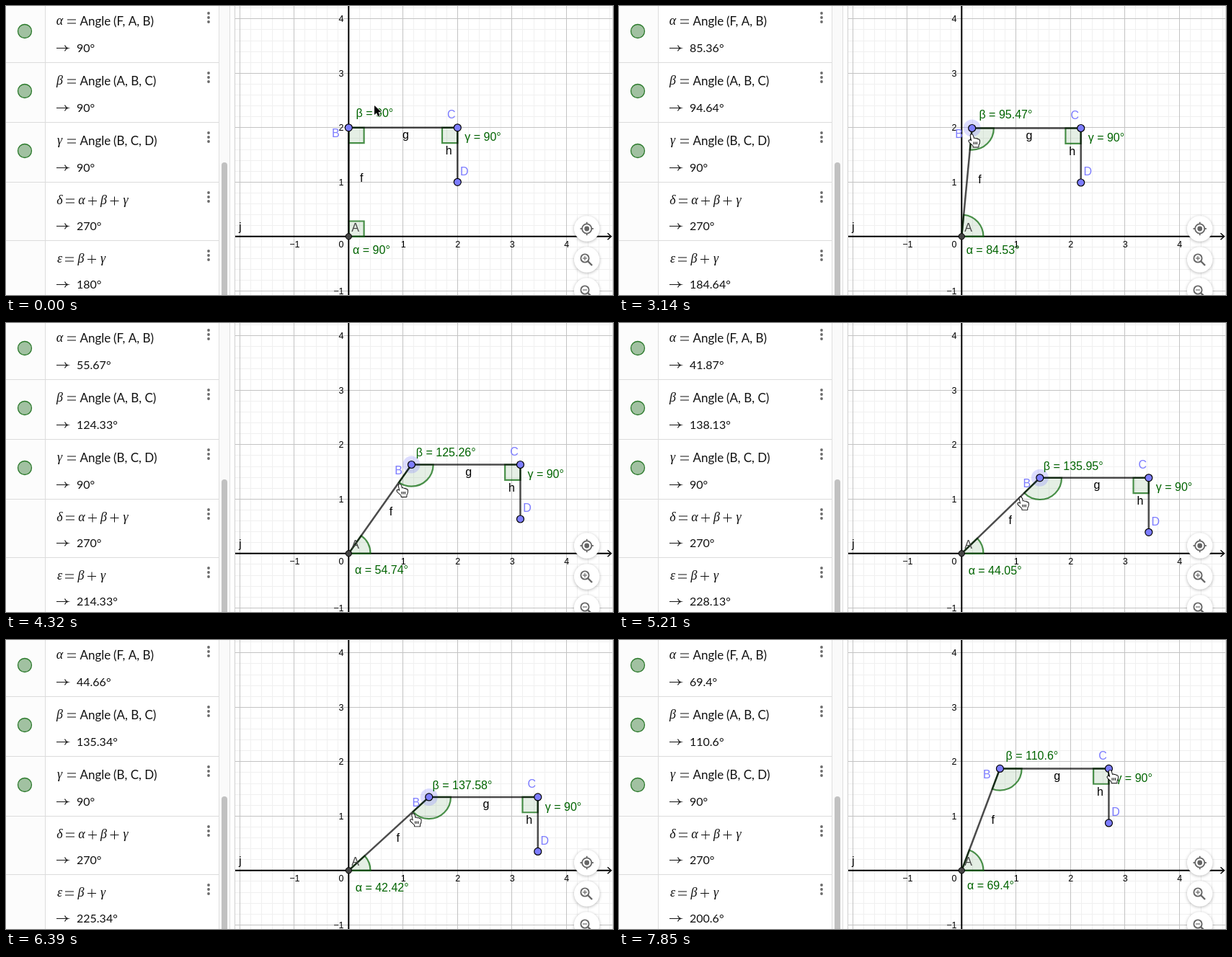
An HTML page with a canvas that plays this animation: 842 by 401 pixels, repeating every 8 s.

```html
<!DOCTYPE html>
<html lang="en">
<head>
<meta charset="utf-8">
<title>Angle sum</title>
<style>
html, body { margin: 0; width: 842px; height: 401px; overflow: hidden; background: #fff; }
canvas { display: block; width: 842px; height: 401px; }
</style>
</head>
<body>
<canvas id="stage"></canvas>
<script>
const W = 842, H = 401, LOOP = 8000, START = 450, STEP = 148, LAST = 50;
const OX = 475.3, OY = 319.8, UNIT = 75.5;
const GREEN = '#006400', BLUE = '#7d7dff';
const SANS = '"Liberation Sans", Arial, sans-serif';
const PANEL = 'Lato, sans-serif';
const MATH = 'italic 18px "Liberation Serif", serif';

const canvas = document.getElementById('stage');
const dpr = window.devicePixelRatio || 1;
canvas.width = W * dpr;
canvas.height = H * dpr;
const c = canvas.getContext('2d');

// Keys: step, then values
const TURN = [[17, 90], [17.75, 85.36], [18, 84.53], [25.75, 55.67], [26, 54.74],
  [30, 33.5], [36, 74.2], [36.75, 73.68], [37, 72.21], [41.4, 35.8],
  [43.75, 61.35], [44, 64.61], [45.5, 67], [48, 69.4]];
const POINTER = [[-1, 510.5, 137], [0, 508, 139], [2, 495, 150], [4, 480, 164],
  [5, 477.5, 166.5], [7, 477.5, 166.5], [8, 483, 168], [9, 480, 170.5],
  [17, 480, 170.5], [18, 489.5, 178.5], [26, 546.5, 224], [30, 575, 254],
  [36, 507, 207.5], [37, 528.5, 210], [41.2, 570, 248], [44, 528.5, 196], [48, 523, 192]];

// Monotone cubic interpolation
function curve(keys, k, col = 1) {
  const n = keys.length - 1;
  if (k <= keys[0][0]) return keys[0][col];
  if (k >= keys[n][0]) return keys[n][col];
  let i = 0;
  while (k >= keys[i + 1][0]) i++;
  const slope = j => (keys[j + 1][col] - keys[j][col]) / (keys[j + 1][0] - keys[j][0]);
  const tangent = j => {
    if (j === 0 || j === n) return 0;
    const a = slope(j - 1), b = slope(j);
    return a * b <= 0 ? 0 : 2 * a * b / (a + b);
  };
  const w = keys[i + 1][0] - keys[i][0], u = (k - keys[i][0]) / w, v = 1 - u;
  return keys[i][col] * v * v * (1 + 2 * u) + keys[i + 1][col] * u * u * (3 - 2 * u)
    + w * u * v * (tangent(i) * v - tangent(i + 1) * u);
}

const round = v => Math.round(v * 100) / 100;
const deg = v => round(v) + '°';

function line(x1, y1, x2, y2, color, width = 1) {
  c.strokeStyle = color;
  c.lineWidth = width;
  c.beginPath();
  c.moveTo(x1, y1);
  c.lineTo(x2, y2);
  c.stroke();
}

function disc(x, y, r, fill, stroke, width = 1) {
  c.beginPath();
  c.arc(x, y, r, 0, Math.PI * 2);
  if (fill) { c.fillStyle = fill; c.fill(); }
  if (stroke) { c.strokeStyle = stroke; c.lineWidth = width; c.stroke(); }
}

function text(s, x, y, font, color = '#000', align = 'left') {
  c.font = font;
  c.fillStyle = color;
  c.textAlign = align;
  c.fillText(s, x, y);
}

const label = (s, x, y, color, align = 'center') =>
  text(s, x, y + 5.6, '16px ' + SANS, color, align);

function equals(x, y) {
  for (const d of [-2, 3]) line(x - 6, y + d, x + 6, y + d, '#111', 1);
}

function plus(x, y) {
  line(x - 6, y + .5, x + 6, y + .5, '#111', 1);
  line(x, y - 5.5, x, y + 6.5, '#111', 1);
}

function row(y, valueY, name, value) {
  text(name, 74.5, y + 5, MATH, '#111', 'center');
  for (const d of [-6, 0, 6]) disc(281, y - 5 + d, 1.9, '#6b6b6b');
  line(70, valueY + .5, 85.5, valueY + .5, '#222', 1.1);
  c.beginPath();
  c.moveTo(81.5, valueY - 3.5);
  c.quadraticCurveTo(83, valueY, 86, valueY + .5);
  c.quadraticCurveTo(83, valueY + 1, 81.5, valueY + 4.5);
  c.stroke();
  text(value, 98, valueY + 6, '16px ' + PANEL, '#111');
}

function panel(alpha) {
  c.fillStyle = '#fff';
  c.fillRect(0, 0, 318, H);
  c.fillStyle = '#fcfcfc';
  c.fillRect(0, 0, 54, H);
  c.fillStyle = '#fafafa';
  c.fillRect(296, 0, 14, H);
  for (const y of [78.5, 161.5, 244.5, 325.5]) line(0, y, 295, y, '#dcdcdc');
  line(54.5, 0, 54.5, H, '#dcdcdc');
  line(295.5, 0, 295.5, H, '#dedede');
  line(310.5, 0, 310.5, H, '#dedede');
  c.fillStyle = '#c1c1c1';
  c.beginPath();
  c.roundRect(299, 217, 8, 200, 4);
  c.fill();

  const beta = 180 - alpha;
  const angles = [['α', '(F, A, B)', alpha], ['β', '(A, B, C)', beta], ['γ', '(B, C, D)', 90]];
  angles.forEach(([name, args, value], i) => {
    const y = 21 + i * 83;
    disc(26, y + 14, 9.5, '#a1c1a1', '#2c7a2c', 1.3);
    row(y, y + 37, name, deg(value));
    equals(91, y);
    text('Angle', 102.5, y + 6, '17px ' + PANEL, '#111');
    text(args, 149, y + 6, '17px ' + PANEL, '#111');
  });

  row(270, 305, 'δ', '270°');
  equals(89, 270);
  [['α', 105], ['β', 135.5], ['γ', 166]].forEach(([s, x]) => text(s, x, 275, MATH, '#111', 'center'));
  plus(120, 270);
  plus(150.5, 270);

  row(351, 386, 'ε', deg(beta + 90));
  equals(88, 351);
  text('β', 104, 356, MATH, '#111', 'center');
  plus(119, 351);
  text('γ', 134.5, 356, MATH, '#111', 'center');
}

function grid() {
  const draw = (step, color) => {
    for (let i = -30; i <= 30; i++) {
      const x = Math.floor(OX + i * step) + .5, y = Math.floor(OY + i * step) + .5;
      if (x > 318) line(x, 0, x, H, color);
      line(318, y, W, y, color);
    }
  };
  draw(UNIT / 5, '#f0f0f0');
  draw(UNIT, '#c3c3c3');
  line(OX, 0, OX, H, '#000', 2);
  line(318, OY, 839, OY, '#000', 2);
  c.lineWidth = 1.5;
  c.beginPath();
  c.moveTo(834.5, OY - 4.5);
  c.lineTo(839.5, OY);
  c.lineTo(834.5, OY + 4.5);
  c.stroke();

  const font = '12.5px ' + SANS;
  for (let i = -1; i <= 4; i++) {
    const s = String(i).replace('-', '−');
    if (i) text(s, OX + i * UNIT + .5, 335, font, '#000', 'center');
    if (i) text(s, 468.5, OY - i * UNIT + 4.3, font, '#000', 'right');
  }
  text('0', 468.5, 335, font, '#000', 'right');
}

// Marks the angle between two directions in degrees, clockwise on screen
function mark(x, y, from, to) {
  const a = from * Math.PI / 180, b = to * Math.PI / 180;
  c.beginPath();
  c.moveTo(x, y);
  if (round(to - from) === 90) {
    const s = 21.3, ax = s * Math.cos(a), ay = s * Math.sin(a);
    c.lineTo(x + ax, y + ay);
    c.lineTo(x + ax - ay, y + ay + ax);
    c.lineTo(x - ay, y + ax);
  } else {
    c.arc(x, y, 30.2, a, b);
  }
  c.closePath();
  c.fillStyle = 'rgba(0,100,0,.1)';
  c.fill();
  c.strokeStyle = 'rgba(0,100,0,.7)';
  c.lineWidth = 2.2;
  c.stroke();
}

function figure(alpha, held) {
  const rad = alpha * Math.PI / 180, half = rad / 2, cos = Math.cos, sin = Math.sin;
  const bx = OX + 2 * UNIT * cos(rad), by = OY - 2 * UNIT * sin(rad);
  const cx = bx + 2 * UNIT, dy = by + UNIT;

  mark(OX, OY, -alpha, 0);
  mark(bx, by, 0, 180 - alpha);
  mark(cx, by, 90, 180);
  if (held) disc(bx, by, 12, 'rgba(125,125,255,.27)');

  const ink = 'rgba(0,0,0,.7)';
  line(OX, OY, bx, by, ink, 2.5);
  line(bx, by, cx, by, ink, 2.5);
  line(cx, by, cx, dy, ink, 2.5);
  disc(OX, OY, 4.2, '#444', '#000', 1);
  for (const [x, y] of [[bx, by], [cx, by], [cx, dy]]) disc(x, y, 5, BLUE, '#000', 1.2);

  label('A', 484.5, 307, '#444');
  label('B', bx - 18, by + 7.7, BLUE);
  label('C', cx - 8.5, by - 18.5, BLUE);
  label('D', cx + 9.5, dy - 15.3, BLUE);
  label('f', (OX + bx) / 2 + 2 + 16 * sin(rad), (OY + by) / 2 - 5.8 + 16 * cos(rad));
  label('g', bx + UNIT + 3.7, by + 9.7);
  label('h', cx - 12, by + UNIT / 2 - 6);
  label('j', 324.7, 306);
  label('α = ' + deg(alpha), OX - 5.5 + 16 * cos(half), OY + 29.5 - 16 * sin(half), GREEN, 'left');
  // the bisector at B is the one at A turned by a right angle
  label('β = ' + deg(180 - alpha), bx - 1 + 16 * sin(half), by - 31.3 + 16 * cos(half), GREEN, 'left');
  label('γ = 90°', cx + 10, by + 13, GREEN, 'left');
}

function lens(y, plusSign) {
  disc(803, y - 2, 5.6, null, '#666', 1.9);
  line(807, y + 2, 813, y + 8, '#666', 2.4);
  line(800, y - 2, 806, y - 2, '#666', 1.2);
  if (plusSign) line(803, y - 5, 803, y + 1, '#666', 1.2);
}

function buttons() {
  for (const y of [309, 352, 395]) {
    c.save();
    c.shadowColor = 'rgba(0,0,0,.28)';
    c.shadowBlur = 4 * dpr;
    c.shadowOffsetY = dpr;
    disc(805.7, y, 17.8, '#fff');
    c.restore();
  }
  disc(805.7, 309, 6.6, null, '#666', 1.8);
  disc(805.7, 309, 3.4, '#666');
  for (const [x, y] of [[1, 0], [-1, 0], [0, 1], [0, -1]])
    line(805.7 + 6 * x, 309 + 6 * y, 805.7 + 9.2 * x, 309 + 9.2 * y, '#666', 1.8);
  lens(352, true);
  lens(396, false);
}

function shape(x, y, d, fill, stroke, width) {
  const path = new Path2D(d);
  c.save();
  c.translate(x, y);
  c.lineJoin = 'round';
  c.fillStyle = fill;
  c.strokeStyle = stroke;
  c.lineWidth = width;
  c.stroke(path);
  c.fill(path);
  c.restore();
}

const arrow = (x, y) =>
  shape(x, y, 'M.5 1V14L3.5 11.2 5.6 16 8 15 6 10.3H10.2Z', '#000', '#fff', 1.6);

function hand(x, y) {
  shape(x - 5, y - 1, 'M3.2 2.6Q3 .8 4.6 .8T6.5 2.4L7.6 6.6Q9.4 5.4 10.4 7' +
    'Q12.2 6 13 7.8Q15.6 7.2 15.6 10Q15.7 13 14 15.5V18H7V16.2L1.8 11.4' +
    'Q.2 9.6 1.5 8.9T4.8 10.2Z', '#fff', '#000', 1.8);
  for (const i of [0, 1, 2]) line(x + 2.5 + 2.2 * i, y + 10, x + 2.6 + 2.2 * i, y + 13.5, '#000', 1);
}

function pointer(k) {
  if (k === LAST) hand(681.5, 181.3);
  else if (k < LAST - 1) (k < 4 ? arrow : hand)(curve(POINTER, k, 1), curve(POINTER, k, 2));
}

function draw(t) {
  const k = t < START ? -1 : Math.min(LAST, Math.floor((t - START) / STEP));
  c.setTransform(dpr, 0, 0, dpr, 0, 0);
  c.fillStyle = '#fff';
  c.fillRect(0, 0, W, H);
  grid();
  figure(curve(TURN, k), k >= 13 && k < LAST - 1);
  buttons();
  panel(curve(TURN, k - .25));
  line(317.5, 0, 317.5, H, '#cfcfcf');
  line(841.5, 0, 841.5, H, '#dcdcdc');
  pointer(k);
}

const begin = performance.now();
function tick() {
  draw((performance.now() - begin) % LOOP);
  requestAnimationFrame(tick);
}
tick();
</script>
</body>
</html>
```
